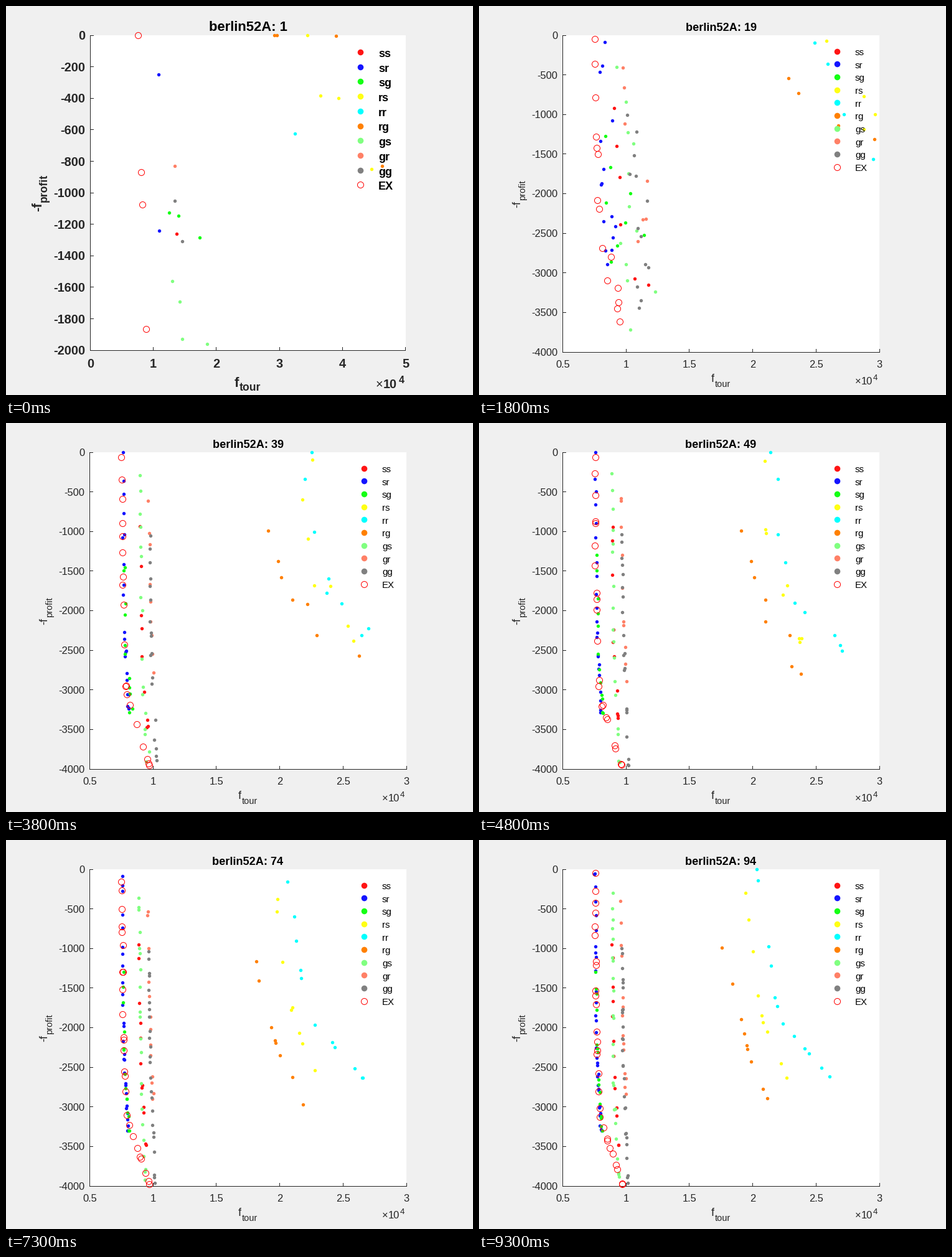
Write a matplotlib script that moves like this. It is 750 px wide and 625 px high and loops after 9.4 s.

```python
import numpy as np
import matplotlib.pyplot as plt
from matplotlib.animation import FuncAnimation

W, H, DPI = 750, 625, 100
GENERATIONS = 94
LIFE = 12  # generations a solution survives
INK = "#262626"
COLORS = {
    "ss": "#ff1414", "sr": "#1414ff", "sg": "#14ff14", "rs": "#ffff14",
    "rr": "#00ffff", "rg": "#ff8000", "gs": "#80ff80", "gr": "#ff8066",
    "gg": "#808080", "EX": "#ff0000",
}

plt.rcParams["font.family"] = "Liberation Sans"


class Front:
    """A front that relaxes from one polyline (tour, profit) to another."""

    def __init__(self, counts, tau, start, end):
        self.counts, self.tau = counts, tau
        self.start, self.end = np.array(start), np.array(end)

    def size(self, gen):
        first, last = self.counts
        grown = np.sqrt((gen - 1) / (GENERATIONS - 1))
        return round(first + (last - first) * grown)

    def at(self, u, gen):
        decay = np.exp((1 - gen) / self.tau)
        knots = self.end + (self.start - self.end) * decay
        s = np.linspace(0, 1, len(knots))
        return np.interp(u, s, knots[:, 0]), np.interp(u, s, knots[:, 1])


FAST, SLOW = 8, 18
FRONTS = {
    "ss": Front((1, 13), FAST, [(1.0, 300), (1.37, 1260), (1.6, 2900)],
                [(0.89, 950), (0.90, 2400), (0.94, 3480)]),
    "sr": Front((2, 31), FAST, [(1.08, 250), (1.085, 745), (1.09, 1240)],
                [(0.754, 0), (0.765, 2200), (0.80, 3300)]),
    "sg": Front((3, 15), FAST, [(1.25, 1125), (1.40, 1145), (1.735, 1285)],
                [(0.765, 1300), (0.775, 2600), (0.81, 3300)]),
    "rs": Front((4, 9), SLOW,
                [(3.44, 0), (3.65, 382), (3.94, 400), (4.46, 850)],
                [(1.92, 120), (2.02, 1600), (2.08, 2000), (2.25, 2650)]),
    "rr": Front((1, 12), SLOW, [(3.2, 0), (3.25, 625), (3.4, 700)],
                [(2.02, 0), (2.2, 1900), (2.63, 2690)]),
    "rg": Front((4, 9), SLOW,
                [(2.92, 0), (2.96, 0), (3.9, 5), (4.63, 830)],
                [(1.75, 1000), (1.92, 2050), (1.95, 2350), (2.13, 3020)]),
    "gs": Front((4, 23), FAST,
                [(1.295, 1560), (1.415, 1690), (1.46, 1930), (1.85, 1960)],
                [(0.889, 260), (0.895, 1400), (0.90, 2800), (0.94, 3920)]),
    "gr": Front((1, 14), FAST, [(1.1, 500), (1.34, 830), (1.5, 1200)],
                [(0.955, 390), (0.975, 2000), (1.0, 2900)]),
    "gg": Front((2, 27), FAST, [(1.34, 1050), (1.40, 1180), (1.46, 1310)],
                [(0.965, 1000), (0.975, 2400), (1.015, 3960)]),
    "EX": Front((4, 28), FAST,
                [(0.755, 0), (0.81, 870), (0.83, 1075), (0.88, 1865)],
                [(0.754, 50), (0.758, 1570), (0.79, 3100), (0.97, 3980)]),
}

rng = np.random.default_rng(52)
noise = {name: rng.uniform(-1, 1, (40, GENERATIONS + 1, 2)) for name in FRONTS}
phases = {name: rng.integers(0, LIFE, 40) for name in FRONTS}


def population(name, gen):
    """Every solution keeps the place on the front it was born at."""
    front = FRONTS[name]
    pts = []
    for k in range(front.size(gen)):
        born = max(1, gen - (gen + phases[name][k]) % LIFE)
        du, dx = noise[name][k, born] if born > 1 else (0, 0)
        n = max(front.size(born), k + 1)
        u = 0.5 if n == 1 else np.clip((k + 0.6 * du) / (n - 1), 0, 1)
        x, y = front.at(u, born)
        pts.append((x + 0.005 * dx, y))
    return np.array(pts)


def view(gen):
    """Axis limits, tick steps and plot box (left, right, top, bottom)."""
    if gen == 1:
        return 0, 5, 2000, 1, 200, (135.5, 641.5, 47, 553)
    box = (134.5, 643, 47, 556)
    if gen <= 3:
        lo, hi, depth = 0.5, 4.5, 2500
    elif gen <= 6:
        lo, hi, depth = 0.5, 4, 3000
    elif gen <= 14:
        lo, hi, depth = 0.5, 3.5, 3500
    else:
        lo, hi, depth = 0.5, 3, 4000
    return lo, hi, depth, 0.5, 500, box


fig = plt.figure(figsize=(W / DPI, H / DPI), dpi=DPI, facecolor="#f0f0f0")
ax = fig.add_axes([0, 0, 1, 1])


def pt(px):
    return px * 72 / DPI


def label(x, y, s, px, **kw):
    kw.setdefault("color", INK)
    ax.text(x, y, s, fontsize=pt(px), va="baseline", **kw)


def stroke(xs, ys):
    """One-pixel line through pixel centres."""
    ax.plot(np.floor(xs) + 0.5, np.floor(ys) + 0.5, color=INK, lw=pt(1),
            snap=False, solid_capstyle="projecting")


def dots(x, y, name, size):
    ring = name == "EX"
    ax.plot(x, y, "o", ms=pt(10 if ring else size), snap=False,
            mfc="none" if ring else COLORS[name], mec=COLORS[name],
            mew=pt(1) if ring else 0)


def draw_ticks(gen, size, weight):
    lo, hi, depth, xstep, ystep, (l, r, t, b) = view(gen)
    ax.add_patch(plt.Rectangle((l, t), r - l, b - t, fc="white", lw=0))
    stroke([l, l, r], [t, b, b])
    for v in np.arange(lo, hi + xstep / 2, xstep):
        x = l + (v - lo) / (hi - lo) * (r - l)
        stroke([x, x], [b, b - 5])
        label(x, 581, f"{v:g}", size, ha="center", weight=weight)
    for v in range(0, depth + 1, ystep):
        y = t + v / depth * (b - t)
        stroke([l, l + 5], [y, y])
        label(l - 8, y + 0.36 * size, f"{-v}", size, ha="right", weight=weight)


def draw_names(gen, size, weight):
    big, small = size * 1.1, size * 0.88
    label(388.5, 39.5, f"berlin52A: {gen}", big, ha="center", weight="bold",
          color="black")
    if gen == 1:
        x_name, x_sub = (367, 612), (375, 618.5)
        y_name, y_sub = (57.5, 329.5), (65.5, 315)
        times, ten, four = (593.5, 614), (606, 614), (630.5, 606)
    else:
        x_name, x_sub = (373, 604), (379, 612)
        y_name, y_sub = (66.5, 323.5), (74, 312)
        times, ten, four = (603.5, 608), (614, 608), (633, 601)
    label(*x_name, "f", big, weight=weight)
    label(*x_sub, "tour", small, weight=weight)
    turned = dict(weight=weight, rotation=90, rotation_mode="anchor")
    label(*y_name, "-f", big, **turned)
    label(*y_sub, "profit", small, **turned)
    label(*times, "\u00d7", size)
    label(*ten, "10", size, weight=weight)
    label(*four, "4", size * 0.8, weight=weight)


def draw_points(gen):
    lo, hi, depth, _, _, (l, r, t, b) = view(gen)
    for name in FRONTS:
        x, y = population(name, gen).T
        inside = (x <= hi) & (y <= depth)
        dots(l + (x[inside] - lo) / (hi - lo) * (r - l),
             t + y[inside] / depth * (b - t), name, 5.4)


def draw_legend(gen, weight):
    x, y, step, drop, size = ((569, 74, 23.7, 8, 18) if gen == 1
                              else (575, 72.5, 20.67, 6.5, 15))
    for i, name in enumerate(COLORS):
        dots([x], [y + i * step], name, 9.6)
        label(x + 29, y + i * step + drop, name, size, color="black",
              weight=weight)


def draw(i):
    gen = i + 1
    size, weight = (20, "bold") if gen == 1 else (16.5, "normal")
    ax.clear()
    ax.set_axis_off()
    ax.set_xlim(0, W)
    ax.set_ylim(H, 0)
    draw_ticks(gen, size, weight)
    draw_names(gen, size, weight)
    draw_points(gen)
    draw_legend(gen, weight)
    return []


anim = FuncAnimation(fig, draw, frames=GENERATIONS, interval=100,
                     init_func=lambda: [], repeat=True, repeat_delay=0)
plt.show()
```
